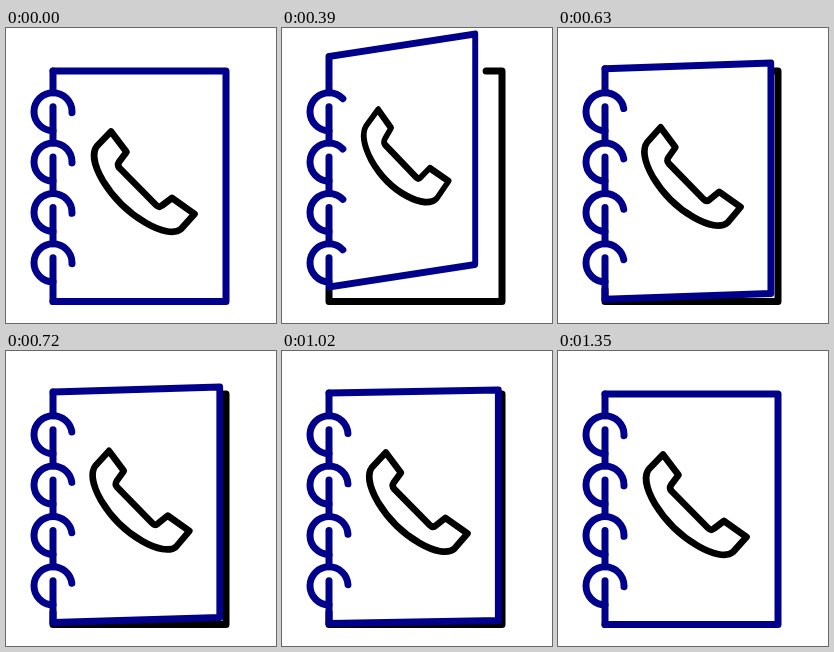
These frames come from a looping animation (270x295 px, 1530 ms). An HTML page with a canvas:

```html
<!DOCTYPE html>
<html lang="en">
<head>
<meta charset="utf-8">
<title>Phone book</title>
<style>
html, body { margin: 0; width: 100%; height: 100%; overflow: hidden; background: #fff; }
canvas { display: block; width: 270px; height: 295px; }
</style>
</head>
<body>
<canvas id="stage" width="270" height="295"></canvas>
<script>
const ctx = document.getElementById('stage').getContext('2d');
const NAVY = '#00008b', BLACK = '#000';
const LOOP = 1530, STEP = 30, LAST_STEP = 45;
const LEFT = 47, RIGHT = 220, TOP = 43, BOTTOM = 273.5, WIDTH = RIGHT - LEFT;
const RING_RADIUS = 19, RINGS = [83.7, 134, 184.4, 234.8];

const handset = new Path2D(
  'M105 103.5 L120.5 124 L113 134 Q111 137 113.5 140 L150 177 Q153 180 156 177.5 ' +
  'L166 170 L188.5 186 L175 201 C162 212 119 189 97 153 C86 134 87 123 91 118 Z');

// Each swing lifts the cover, then lets it fall shut: [start, peak, end, lift, rise power].
const swings = [
  [0, 11, 22, 37.5, 3],
  [22, 28, 35, 12.4, 2],
  [35, 40, 45, 6.5, 2]
];

function liftAt(step) {
  for (const [start, peak, end, lift, power] of swings) {
    if (step <= peak) return lift * (1 - ((peak - step) / (peak - start)) ** power);
    if (step < end) return lift * (1 - ((step - peak) / (end - peak)) ** 2.5);
  }
  return 0;
}

// The far edge rises by lift; the hinge edge rises less and the cover narrows.
function poseAt(step) {
  const lift = liftAt(step);
  return {
    lift,
    hinge: 0.26 * lift + 0.0035 * lift ** 2,
    narrow: 0.95 * lift - 0.0061 * lift ** 2
  };
}

function line(color, points) {
  ctx.strokeStyle = color;
  ctx.lineWidth = 7;
  ctx.beginPath();
  points.forEach(([x, y]) => ctx.lineTo(x, y));
  ctx.stroke();
}

function drawBack({ lift }) {
  line(BLACK, [[RIGHT - lift * 0.43, TOP], [RIGHT, TOP], [RIGHT, BOTTOM], [LEFT, BOTTOM], [LEFT, BOTTOM - 12]]);
}

function drawCover({ lift, hinge, narrow }) {
  ctx.save();
  ctx.transform(1 - narrow / WIDTH, (hinge - lift) / WIDTH, 0, 1, LEFT, -hinge);
  ctx.translate(-LEFT, 0);
  line(NAVY, [[LEFT, TOP], [RIGHT, TOP], [RIGHT, BOTTOM], [LEFT, BOTTOM]]);
  ctx.strokeStyle = BLACK;
  ctx.lineWidth = 6.7;
  ctx.stroke(handset);
  ctx.restore();
}

function drawSpine({ hinge, narrow }) {
  line(NAVY, [[LEFT, TOP - hinge], [LEFT, RINGS[0] - RING_RADIUS]]);
  RINGS.forEach((y, i) => {
    const next = i < 3 ? RINGS[i + 1] - RING_RADIUS : BOTTOM - hinge;
    line(NAVY, [[LEFT, y - 5], [LEFT, next]]);
    ctx.beginPath();
    ctx.arc(LEFT, y, RING_RADIUS, Math.PI / 2, Math.PI * 2 + 0.05 - narrow * 0.03);
    ctx.stroke();
  });
}

function draw(now) {
  const pose = poseAt(Math.min(LAST_STEP, Math.floor((now % LOOP) / STEP)));
  ctx.fillStyle = '#fff';
  ctx.fillRect(0, 0, 270, 295);
  ctx.lineCap = ctx.lineJoin = 'round';
  if (pose.lift > 0) drawBack(pose);
  drawCover(pose);
  drawSpine(pose);
}

const begin = performance.now();
function tick() {
  draw(performance.now() - begin);
  requestAnimationFrame(tick);
}
tick();
</script>
</body>
</html>
```
